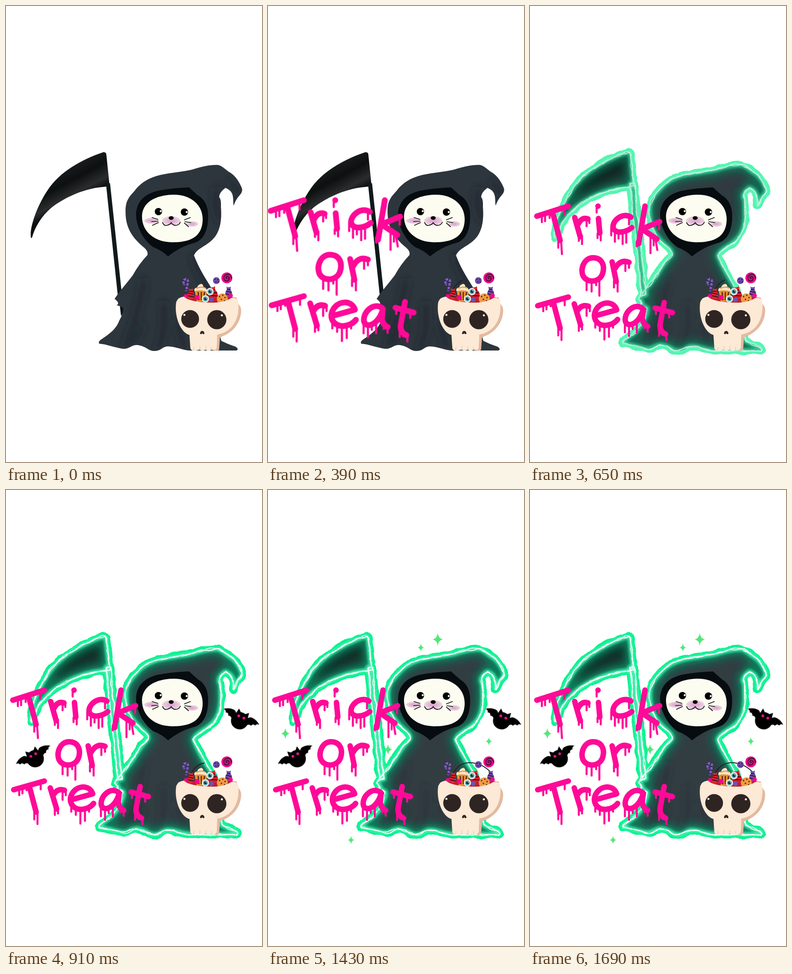
Write an HTML page without scripts that moves like this. It is 561 by 998 pixels and loops after 1820 ms.

```html
<!DOCTYPE html>
<html lang="en">
<head>
<meta charset="utf-8">
<title>Trick or Treat</title>
<style>
html, body { margin: 0; width: 100%; height: 100%; overflow: hidden; background: #fff; }
svg { display: block; width: 100%; height: 100%; }
.step { animation: 1.82s step-end infinite; }
.round { fill: none; stroke-linecap: round; stroke-linejoin: round; }

.words { transform-origin: 163px 582px; animation-name: pop; }
.outer { animation-name: outer; }
.inner { animation-name: inner; }
.strands { animation-name: strands; }
.jag { animation: jag .91s step-end infinite; }
.jag.alt { animation-delay: -.52s; }
.bats { animation-name: bats; }
.flap { animation: flap .26s step-end infinite; }
.stars { animation-name: stars; }
.first { animation-name: first; }
.hoop { stroke-dasharray: 100 200; animation-name: hoop; }

@keyframes pop {
  0% { transform: scale(0); }
  7.14% { transform: translate(4px, 126px) scale(.45); }
  14.28% { transform: translate(2px, 25px) scale(.745); }
  21.42% { transform: translate(-1px, -5px) scale(1.055); }
  28.57%, 100% { transform: none; }
}
@keyframes outer { 0% { opacity: 0; } 35.71% { opacity: .7; } 42.85%, 100% { opacity: 1; } }
@keyframes inner { 0% { opacity: 0; } 28.57% { opacity: .4; } 35.71% { opacity: .75; } 42.85%, 100% { opacity: 1; } }
@keyframes strands { 0% { opacity: 0; } 28.57% { opacity: .25; } 35.71% { opacity: .7; } 42.85%, 100% { opacity: 1; } }
@keyframes jag { 0% { filter: url(#jagA); } 28.57% { filter: url(#jagB); } 57.14%, 100% { filter: url(#jagC); } }
@keyframes bats { 0% { opacity: 0; } 42.85%, 100% { opacity: 1; } }
@keyframes flap { 0% { transform: translateX(-7px); } 49.9%, 100% { transform: none; } }
@keyframes stars { 0% { opacity: 0; } 71.42% { opacity: .7; } 78.57%, 100% { opacity: 1; } }
@keyframes first { 0% { opacity: 0; } 64.28% { opacity: .45; } 71.42%, 100% { opacity: 1; } }
@keyframes hoop {
  0% { stroke-dashoffset: 101; }
  14.28% { stroke-dashoffset: 65; }
  50% { stroke-dashoffset: 58; }
  64.28% { stroke-dashoffset: 40; }
  78.57%, 100% { stroke-dashoffset: 0; }
}
</style>
</head>
<body>
<svg viewBox="0 0 561 998" role="img" aria-label="Trick or Treat">
<defs>
  <path id="blade" d="M55 508C50 490 66 440 92 402C117 364 165 336 213 320Q220 319 220 326L227 394Q215 396 204 397C165 402 126 421 100 441C77 460 63 485 57 507Z"/>
  <path id="pole" d="M219 388L228 388L254 632L245 634Z"/>
  <path id="robe" d="M310 545Q312 537 303 529C284 513 262 492 262 452C261 424 272 416 283 403C298 384 315 376 337 370C365 364 386 363 408 358C430 351 450 347 465 348C475 350 481 359 492 365C503 372 512 386 517 399Q519 406 513 413Q503 424 499 437C496 424 503 407 481 398Q468 407 467 418Q472 423 471 440C474 480 465 503 446 517C432 528 417 533 412 546C424 578 440 600 453 622C469 660 462 700 472 733Q488 741 504 746Q511 752 505 754L410 754C391 756 374 745 355 745C342 745 341 755 325 755C311 755 307 744 288 742C274 741 270 752 255 750C240 748 220 740 204 739Q202 735 207 731C228 717 242 706 248 689Q257 673 257 661Q247 655 242 655Q251 651 238 641C248 625 263 609 278 589Q291 565 310 545Z"/>
  <g id="shape"><use href="#blade"/><use href="#pole"/><use href="#robe"/></g>
  <clipPath id="inside"><use href="#blade"/><use href="#pole"/><use href="#robe"/></clipPath>

  <linearGradient id="steel" gradientUnits="userSpaceOnUse" x1="120" y1="350" x2="160" y2="425">
    <stop offset="0" stop-color="#1d2122"/><stop offset=".45" stop-color="#0d1011"/>
    <stop offset=".8" stop-color="#2a2c2d"/><stop offset="1" stop-color="#0c0f10"/>
  </linearGradient>
  <radialGradient id="blush"><stop offset=".2" stop-color="#dba9cf"/><stop offset="1" stop-color="#eed5e3"/></radialGradient>

  <filter id="soft" filterUnits="userSpaceOnUse" x="0" y="290" width="561" height="500"><feGaussianBlur stdDeviation="9"/></filter>
  <filter id="haze" filterUnits="userSpaceOnUse" x="0" y="290" width="561" height="500"><feGaussianBlur stdDeviation="3"/></filter>
  <filter id="jagA" filterUnits="userSpaceOnUse" x="0" y="290" width="561" height="500" color-interpolation-filters="sRGB">
    <feTurbulence type="fractalNoise" baseFrequency=".05" seed="3"/><feDisplacementMap in="SourceGraphic" scale="9" xChannelSelector="R" yChannelSelector="G"/>
  </filter>
  <filter id="jagB" filterUnits="userSpaceOnUse" x="0" y="290" width="561" height="500" color-interpolation-filters="sRGB">
    <feTurbulence type="fractalNoise" baseFrequency=".05" seed="11"/><feDisplacementMap in="SourceGraphic" scale="9" xChannelSelector="R" yChannelSelector="G"/>
  </filter>
  <filter id="jagC" filterUnits="userSpaceOnUse" x="0" y="290" width="561" height="500" color-interpolation-filters="sRGB">
    <feTurbulence type="fractalNoise" baseFrequency=".05" seed="24"/><feDisplacementMap in="SourceGraphic" scale="9" xChannelSelector="R" yChannelSelector="G"/>
  </filter>

  <path id="wing" d="M12 -9Q16 -18 23 -17Q34 -17 43 -9Q37 -10 35 -4Q30 -7 27 0Q22 -3 16 5Z"/>
  <g id="bat">
    <use href="#wing"/><use href="#wing" transform="scale(-1 1)"/>
    <circle r="19"/><path d="M-14 -12L-12 -24L-4 -17ZM14 -12L12 -24L4 -17Z"/>
    <g fill="#f0148c"><circle cx="-6" cy="-9" r="3"/><circle cx="6" cy="-9" r="3"/></g>
  </g>
  <path id="star" d="M0 -14Q1.500 -2 11 0Q1.500 2 0 14Q-1.500 2 -11 0Q-1.500 -2 0 -14Z"/>
  <g id="eyeball"><circle r="8" fill="#e9f0ec"/><circle r="5.500" fill="#5cb2bd"/><circle r="3" fill="#15272d"/><circle cx="1.500" cy="-1.500" r="1" fill="#fff"/></g>
  <g id="wrapped">
    <path d="M-4 -6L-5 -13Q0 -10 5 -13L4 -6Q10 0 6 9Q0 13 -6 9Q-10 0 -4 -6Z"/>
    <path d="M-6 -3L6 0M-7 3L7 6M-4 -7L4 -6" stroke="#2b1a26" stroke-width="2"/>
  </g>
</defs>

<g class="step outer"><g class="jag round" stroke="#06f18e" stroke-width="17"><use href="#shape"/></g></g>

<!-- Scythe and cloak -->
<use href="#blade" fill="url(#steel)"/>
<use href="#pole" fill="#11191b"/>
<path d="M249 652L256 652L258 671L252 678Z" fill="#0d1315"/>
<use href="#robe" fill="#2d363d"/>
<g clip-path="url(#inside)">
  <g class="round" filter="url(#soft)" stroke="#1b2329" stroke-width="8">
    <path d="M302 600Q292 670 262 745M345 650Q352 710 332 752M375 690L392 750M462 400Q452 440 472 470M492 385L512 412M412 548Q425 590 450 622M280 735L300 700"/>
  </g>
  <g class="step inner round">
    <use href="#blade" fill="#14483a" opacity=".55"/>
    <use href="#robe" fill="#3f5252" opacity=".3"/>
    <g filter="url(#soft)" stroke="#0d7a5a" stroke-width="30"><use href="#shape"/></g>
    <g filter="url(#haze)" stroke="#1be29a" stroke-width="11"><use href="#shape"/></g>
  </g>
</g>
<g class="step strands round">
  <g filter="url(#haze)" stroke="#8dffd3" stroke-width="4" opacity=".8"><use href="#shape"/></g>
  <g class="jag" stroke="#f2fff9" stroke-width="2.400"><use href="#shape"/></g>
  <g class="jag alt" stroke="#f2fff9" stroke-width="1.600"><use href="#shape"/></g>
</g>

<!-- Face -->
<path d="M401 397L420 414Q443 427 443 460C443 493 432 512 414 518Q382 526 355 548Q342 535 323 528C300 512 285 481 285 455C287 426 305 412 330 405Q365 398 401 397Z" fill="#060c0f"/>
<path d="M366 413C404 412 432 435 431 468C430 500 411 516 370 517C330 519 298 497 298 460C299 429 328 414 366 413Z" fill="#fdfcf0"/>
<g fill="url(#blush)">
  <ellipse cx="319" cy="470" rx="16" ry="6.500"/><ellipse cx="408" cy="477" rx="13" ry="6"/>
  <ellipse cx="362" cy="470" rx="20" ry="10"/>
</g>
<circle cx="334" cy="450" r="8"/><circle cx="391" cy="451" r="8"/><ellipse cx="362" cy="464" rx="5.500" ry="4"/>
<g fill="#fff"><circle cx="339" cy="449" r="2.200"/><circle cx="396" cy="451" r="2.200"/></g>
<path class="round" stroke="#111" stroke-width="1.700" d="M343 474Q347 482 353 480Q360 478 362 474Q366 481 373 480Q380 479 382 473M320 463L333 467M319 472L333 471M321 480L334 474M391 468L404 463M392 472L405 474M391 475L400 483"/>

<!-- Sweets -->
<path class="step hoop round" pathLength="100" d="M402 630C410 606 426 595 447 597Q474 600 492 622" stroke="#20242a" stroke-width="2.200"/>
<path class="round" d="M395 622L398 608Q401 598 393 598Q387 600 390 609" stroke="#7d5cc0" stroke-width="5"/>
<path class="round" d="M395 622L398 608Q401 598 393 598Q387 600 390 609" stroke="#231d35" stroke-width="5" stroke-dasharray="2 6" style="stroke-linecap:butt"/>
<circle cx="461" cy="601" r="7.500" fill="#6b4aa6"/>
<path class="round" d="M458 598h.1M464 599h.1M460 604h.1M465 604h.1" stroke="#241733" stroke-width="2.400"/>
<circle cx="484" cy="595" r="12" fill="#f2058c"/>
<path class="round" d="M485 596Q482 597 482 594Q484 590 488 593Q491 599 485 602Q477 602 477 594Q480 586 488 587Q494 590 494 596" stroke="#4b1239" stroke-width="2.500"/>
<path d="M385 642Q430 626 506 639L495 652H400Z" fill="#b4232e"/>
<use href="#wrapped" transform="translate(405 631)" fill="#e42330"/>
<use href="#wrapped" transform="translate(455 629) rotate(-10) scale(1.150)" fill="#e01c2c"/>
<use href="#wrapped" transform="translate(488 627)" fill="#7350ae"/>
<path d="M413 622L441 622L437 647L418 647Z" fill="#ef8f2e"/>
<path d="M421 626L423 644M428 626V644M435 626L433 644" stroke="#50271d" stroke-width="2.500"/>
<path d="M413 624Q411 617 419 616Q420 610 428 608Q433 610 432 614Q441 617 440 625Q427 620 413 624Z" fill="#fae5ca"/>
<path d="M418 618Q427 613 436 617" class="round" stroke="#ec8b32" stroke-width="2"/>
<circle cx="474" cy="641" r="12" fill="#f19a45"/>
<path class="round" d="M468 636h.1M475 633h.1M480 638h.1M472 642h.1M479 645h.1" stroke="#382019" stroke-width="3"/>
<g fill="#f2058c"><circle cx="394" cy="635" r="4.500"/><circle cx="419" cy="638" r="5.500"/><circle cx="492" cy="634" r="5"/></g>
<circle cx="450" cy="643" r="5" fill="#7350ae"/>
<use href="#eyeball" x="447" y="625"/><use href="#eyeball" x="437" y="641"/>

<!-- Skull -->
<path d="M500 640Q507 645 510 653Q517 660 515 672C512 700 491 718 469 725L467 752Q463 757 455 753L440 730Z" fill="#e3baa0"/>
<path d="M373 648Q377 637 390 636Q398 645 430 648Q472 653 494 639Q504 637 508 643C515 682 497 714 463 719L462 747Q460 756 450 752Q444 757 438 752Q430 756 424 752Q406 758 404 749L402 720C383 715 368 680 373 648Z" fill="#fce9d6"/>
<path class="round" d="M411 753L412 747M425 752L425 745M438 752L438 745M451 752L450 747" stroke="#ebcbb3" stroke-width="1.500"/>
<g fill="#2e2523">
  <circle cx="403.500" cy="685" r="19.500"/><circle cx="462" cy="686.500" r="21"/>
  <path d="M425 717Q426 711 430 711Q434 711 435 717Q432 720 430 716Q428 720 425 717Z"/>
</g>
<g fill="#fff"><circle cx="391" cy="676" r="2.300"/><circle cx="473" cy="677" r="2.300"/></g>

<!-- Lettering -->
<g class="step words round" stroke="#ff0a98">
  <path stroke-width="12" d="M15 460L84 438M49 450L66 513
    M98 463L110 505M105 478Q113 461 127 466
    M149 438h.1M150 465L153 497
    M221 462C203 451 181 469 182 484C185 500 210 496 223 485
    M252 438L238 520M284 472L245 488L278 510
    M138 551C119 551 110 574 116 590C124 607 152 606 159 586C165 567 157 551 138 551Z
    M180 560L189 603M186 575Q198 553 217 561
    M17 656L84 637M51 648L66 705
    M97 652L111 698M104 667Q113 652 128 657
    M143 678L190 665C184 646 160 646 148 660C132 680 146 700 166 699Q184 697 192 686
    M247 662C229 648 205 671 209 690C214 706 240 695 248 664L246 684Q248 697 258 701
    M294 649L285 697Q284 713 297 718M274 661L312 671"/>
  <path stroke-width="4.500" d="M26 460V473M33 458V471M43 456V464M62 510V529M68 512L70 543M75 445V457
    M107 500V514M114 503V521M124 468V482M130 467V475
    M148 498V508M155 498V513M146 442V452
    M178 485V502M186 492V516M194 496V509M203 496V521M211 494V518M217 464V478
    M234 515V526M241 518V522M264 504V541M271 508V524M275 510L279 534M283 474V489
    M124 598V622M135 602V625M152 598V634M145 601V611
    M184 602V616M192 603V625M209 562V580M217 562V573
    M29 655V668M36 652V664M45 650V657M62 706V721M69 706V731M76 641V655
    M107 696V711M114 698V708M124 659V678M131 658V668
    M143 690V704M153 697V711M163 700V730M173 700V724M182 697V704
    M208 692V714M217 698V722M225 697V707M234 694V714M257 702L258 713M250 698V705
    M283 703V722M290 714V720M299 718V731M276 663V674M305 672V682"/>
</g>

<!-- Bats -->
<g class="step bats">
  <g class="flap">
    <use href="#bat" transform="translate(64 588) rotate(-28)"/>
    <use href="#bat" transform="translate(512 505) rotate(24)"/>
  </g>
</g>

<!-- Sparkles -->
<g fill="#51e87a">
  <g class="step stars">
    <use href="#star" transform="translate(372 327)"/>
    <use href="#star" transform="translate(335 345) scale(.65)"/>
    <use href="#star" transform="translate(38 533) scale(.86)"/>
    <use href="#star" transform="translate(484 550) scale(.66)"/>
    <use href="#star" transform="translate(182 766) scale(.66)"/>
  </g>
  <g class="step first"><use href="#star" transform="translate(263 568) scale(.84)"/></g>
</g>
</svg>
</body>
</html>
```
